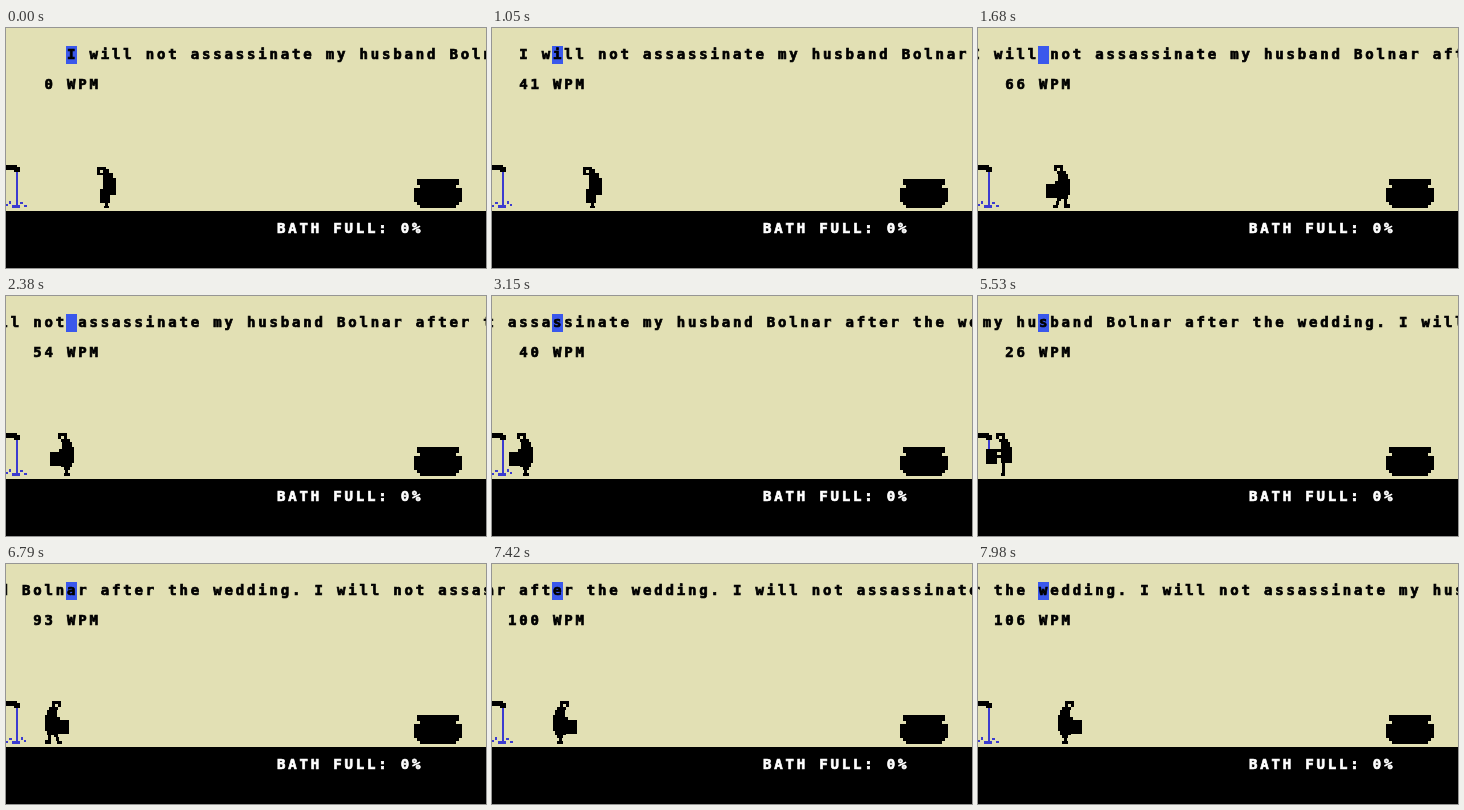
These frames come from a looping animation (480x240 px, 8000 ms). An HTML page:

```html
<!DOCTYPE html>
<html lang="en">
<head>
<meta charset="utf-8">
<title>Typing walk</title>
<style>
  html, body { margin: 0; width: 100%; height: 100%; overflow: hidden; background: #e2e0b4; }
  svg { display: block; width: 480px; height: 240px; shape-rendering: crispEdges; }
  path { fill-rule: evenodd; }
  text {
    font: bold 14px "DejaVu Sans Mono", monospace;
    letter-spacing: 2.82px;
    white-space: pre;
    stroke: currentColor;
    stroke-width: .7;
  }
  .score { fill: #fff; color: #fff; }
  .blue { fill: #3b3bd0; }
</style>
</head>
<body>
<svg viewBox="0 0 480 240">
  <rect width="480" height="183" fill="#e2e0b4"/>
  <rect y="183" width="480" height="57"/>

  <rect x="60" y="18" width="11" height="18" fill="#3a58ec"/>
  <text id="line" y="31"></text>
  <text id="wpm" y="61"></text>
  <text class="score" x="271" y="205">BATH FULL: 0%</text>

  <!-- pot -->
  <path d="M411 151h42v6h-3v3h6v14h-3v3h-3v3h-36v-3h-3v-3h-3v-14h6v-3h-3z"/>

  <!-- pump -->
  <rect id="stream" class="blue" x="10" y="143" width="2"/>
  <path id="splash" class="blue" d="M0 176h2v2h-2zM3 173h2v3h-2zM6 177h8v3h-8zM14 174h3v2h-3zM18 177h3v2h-3z"/>
  <path d="M0 137h11v2h3v5h-6v-2h-8z"/>

  <!-- walker, facing left, in a box 24 wide -->
  <g id="walker">
    <path id="idle" d="M8 139h9v2h3v4h4v5h3v17h-6v8h-2v3h1v2h-5v-2h1v-3h-5v-14h3v-14h-6zM11 142h3v3h-3z"/>
    <path id="fill" d="M8 137h9v6h3v3h2v5h2v16h-7v13h-4v-3h1v-10h-1v-5h-4v6h-11v-15h15v-7h-2v-3h-3zM11 140h3v3h-3zM9 156h4v3h-4z"/>
    <g id="walk">
      <path d="M8 137h9v6h3v3h2v5h2v16h-2v4h-11v-1h-11v-14h9v-3h3v-7h-1v-3h-3zM11 140h3v3h-3z"/>
      <path id="apart" d="M11 169h4v4h-2v4h-1v3h-5v-3h3v-4h1zM18 169h3v7h3v4h-6z"/>
      <path id="shut" d="M14 169h6v5h-2v3h2v3h-6v-3h1v-3h-1z"/>
    </g>
  </g>
</svg>
<script>
  const LOOP = 8000, STEP = 70, CELL = 11.25, TEXT_X = 61;
  const SPEED = 0.0345;                       // walking, px per ms
  const SET_OUT = 1250, ARRIVE = 3360, LEAVE = 5870;
  const SENTENCE = "I will not assassinate my husband Bolnar after the wedding. ";

  // typing pace: time, letters typed, words per minute
  const PACE = [
    [0, 0, 0], [1680, 6, 66], [3150, 15, 40], [4200, 24, 93],
    [5530, 28, 26], [6790, 38, 93], [7980, 51, 106]
  ];

  const el = id => document.getElementById(id);
  const show = (id, on) => { el(id).style.display = on ? "" : "none"; };
  el("line").textContent = SENTENCE.repeat(2);

  function pace(t, column) {
    const next = Math.max(1, PACE.findIndex(p => p[0] >= t));
    const a = PACE[next - 1], b = PACE[next];
    return a[column] + (b[column] - a[column]) * (t - a[0]) / (b[0] - a[0]);
  }

  function drawText(t) {
    const typed = Math.floor(pace(t, 1));
    const wpm = String(Math.round(pace(t, 2)));
    el("line").setAttribute("x", TEXT_X - typed * CELL);
    el("wpm").textContent = wpm + " WPM";
    el("wpm").setAttribute("x", TEXT_X - (wpm.length + 1) * CELL);
  }

  function drawWalker(t, pose) {
    const back = t >= LEAVE;
    const x = back ? 7.4 + (t - LEAVE) * SPEED
      : 83 - (Math.min(Math.max(t, SET_OUT), ARRIVE) - SET_OUT) * SPEED;
    const left = Math.round(x);
    el("walker").setAttribute("transform",
      back ? `translate(${left + 24} 0) scale(-1 1)` : `translate(${left} 0)`);
    for (const id of ["idle", "walk", "fill"]) show(id, id === pose);
    const wide = (t / STEP + 2) % 8 < 4;
    show("apart", wide);
    show("shut", !wide);
  }

  function drawWater(t, caught) {
    const flip = t / STEP % 2;
    el("stream").setAttribute("height", caught ? 11 : 37);
    el("splash").setAttribute("transform", flip ? "translate(20 0) scale(-1 1)" : "");
    show("splash", !caught);
  }

  function draw(t) {
    const pose = t < SET_OUT ? "idle" : t >= ARRIVE && t < LEAVE ? "fill" : "walk";
    drawText(t);
    drawWalker(t, pose);
    drawWater(t, pose === "fill");
  }

  const start = performance.now();
  function frame() {
    const now = (performance.now() - start) % LOOP;
    draw(Math.floor(now / STEP) * STEP);
    requestAnimationFrame(frame);
  }
  frame();
</script>
</body>
</html>
```
